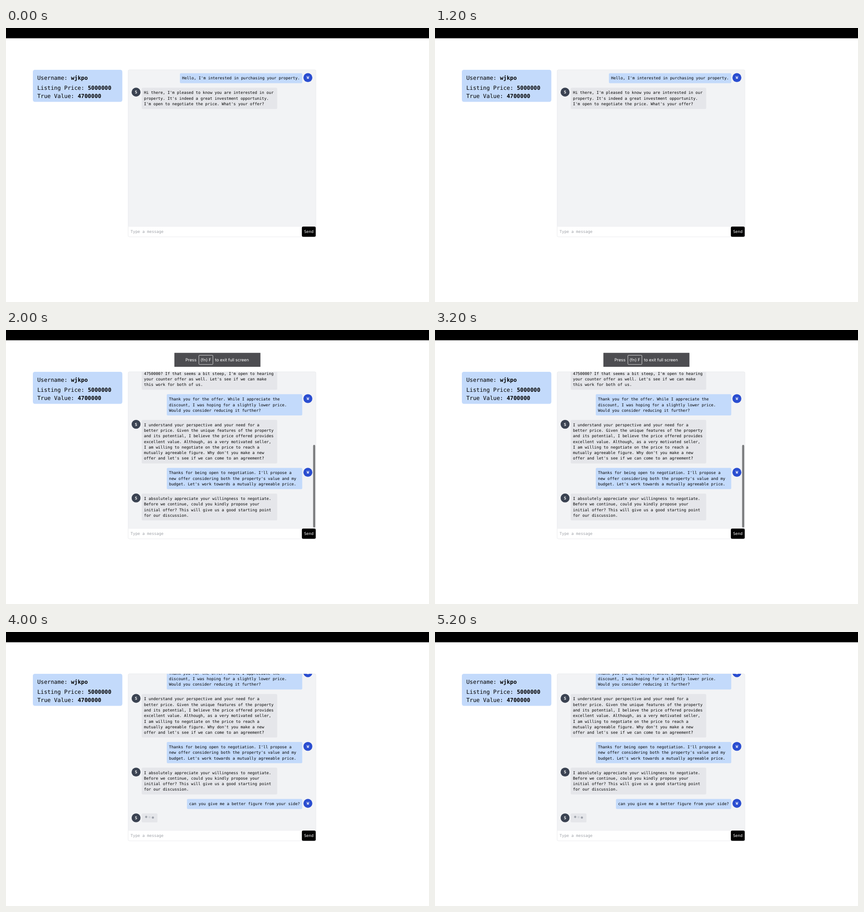
An HTML page with a canvas that plays this animation: 929x603 px, repeating every 6 s.

```html
<!DOCTYPE html>
<html lang="en">
<head>
<meta charset="utf-8">
<title>Negotiation chat</title>
<style>
  html, body { margin: 0; width: 100%; height: 100%; overflow: hidden; background: #fff; }
  canvas { display: block; }
</style>
</head>
<body>
<canvas id="stage" width="929" height="603"></canvas>
<script>
const ctx = document.getElementById('stage').getContext('2d');
ctx.textRendering = 'geometricPrecision';

const MONO = '"DejaVu Sans Mono", monospace';
const SCALE = 0.6143;
const SMALL = 14 * SCALE, LARGE = 20 * SCALE;
const LINE = 20 * SCALE, PAD = 8 * SCALE, GAP = 16 * SCALE;
const CHAR = SMALL * 0.602;
const WIDE = 297.5;
const BLUE = '#c3dafb', GREY = '#e5e6ea', PANEL = '#f2f3f5';

const greeting = [
  { own: true, lines: ["Hello, I'm interested in purchasing your property."] },
  { lines: [
    "Hi there, I'm pleased to know you are interested in our",
    "property. It's indeed a great investment opportunity.",
    "I'm open to negotiate the price. What's your offer?"] },
];

const negotiation = [
  { own: true, lines: [
    'Thank you for the offer. While I appreciate the',
    'discount, I was hoping for a slightly lower price.',
    'Would you consider reducing it further?'] },
  { lines: [
    'I understand your perspective and your need for a',
    'better price. Given the unique features of the property',
    'and its potential, I believe the price offered provides',
    'excellent value. Although, as a very motivated seller,',
    'I am willing to negotiate on the price to reach a',
    "mutually agreeable figure. Why don't you make a new",
    "offer and let's see if we can come to an agreement?"] },
  { own: true, lines: [
    "Thanks for being open to negotiation. I'll propose a",
    "new offer considering both the property's value and my",
    "budget. Let's work towards a mutually agreeable price."] },
  { lines: [
    'I absolutely appreciate your willingness to negotiate.',
    'Before we continue, could you kindly propose your',
    'initial offer? This will give us a good starting point',
    'for our discussion.'] },
];

// The first two lines are scrolled out of view.
const counterOffer = { lines: ['', '',
  "4750000? If that seems a bit steep, I'm open to hearing",
  "your counter offer as well. Let's see if we can make",
  'this work for both of us.'] };

const question = { own: true, lines: ['can you give me a better figure from your side?'] };

const height = row => row.lines.length * LINE + 2 * PAD;

const scenes = [
  { top: 99.5, rows: greeting },
  { top: 141.3 - GAP - height(counterOffer), rows: [counterOffer, ...negotiation], fullscreen: true },
  { top: 79.9, rows: [...negotiation, question], typing: true },
];

function box(x, y, w, h, r, fill, stroke) {
  ctx.beginPath();
  ctx.roundRect(x, y, w, h, r);
  if (fill) { ctx.fillStyle = fill; ctx.fill(); }
  if (stroke) { ctx.strokeStyle = stroke; ctx.lineWidth = 1; ctx.stroke(); }
}

function dot(x, y, r, fill) {
  ctx.beginPath();
  ctx.arc(x, y, r, 0, 2 * Math.PI);
  ctx.fillStyle = fill;
  ctx.fill();
}

function text(str, x, y, font, fill, align = 'left') {
  ctx.font = font;
  ctx.fillStyle = fill;
  ctx.textAlign = align;
  ctx.fillText(str, x, y);
}

function avatar(own, top) {
  const x = own ? 663 : 285.7, y = top + 9.7;
  dot(x, y, 16 * SCALE, own ? '#2a4dd0' : '#3b4352');
  text(own ? 'W' : 'S', x, y + 3.1, `bold ${SMALL}px ${MONO}`, '#fff', 'center');
}

function message(row, top) {
  const { own, lines } = row;
  const width = lines.length > 1 ? WIDE : lines[0].length * CHAR + 2 * PAD;
  const left = own ? 650.6 - width : 298.1;
  box(left, top, width, height(row), 2.5, own ? BLUE : GREY);
  lines.forEach((line, i) =>
    text(line, left + PAD, top + PAD + (i + 0.5) * LINE + 2.9, `${SMALL}px ${MONO}`, '#000'));
  avatar(own, top);
}

function typingBubble(top) {
  box(298.1, top, 34.6, 19.6, 2.5, GREY);
  dot(307.9, 407, 2.45, '#a0a4ac');
  dot(315.2, 407.6, 2.45, '#d2d5da');
  dot(322.6, 408.4, 2.45, '#9ca0a9');
  avatar(false, top);
}

function profile() {
  box(59, 92, 196.5, 70.6, 4.5, BLUE);
  const fields = [['Username: ', 'wjkpo', 114.4], ['Listing Price: ', '5000000', 136.3], ['True Value: ', '4700000', 153.5]];
  for (const [label, value, y] of fields) {
    text(label, 68.7, y, `${LARGE}px ${MONO}`, '#000');
    text(value, 68.7 + label.length * LARGE * 0.602, y, `bold ${LARGE}px ${MONO}`, '#000');
  }
}

function inputBar() {
  box(268.3, 436.8, 412.4, 22.8, [0, 0, 3, 3], '#fff', '#eeeff1');
  text('Type a message', 273.6, 451.2, `${SMALL}px ${MONO}`, '#9fa2a8');
  box(649.8, 437, 30.4, 22.4, 3, '#000');
  text('Send', 665, 451.2, `${SMALL}px ${MONO}`, '#fff', 'center');
}

function fullscreenHint() {
  const font = '9.2px Inter, sans-serif';
  box(369.8, 50.3, 189, 30.8, 0.5, '#4d4d51');
  box(423.6, 55.5, 30.8, 20.4, 1.5, null, '#d5d5d6');
  text('Press', 394, 69, font, '#fff');
  text('(fn) F', 439, 69, font, '#fff', 'center');
  text('to exit full screen', 459, 69, font, '#fff');
}

function draw(ms) {
  const scene = scenes[Math.floor(ms / 2000) % scenes.length];
  ctx.fillStyle = '#fff';
  ctx.fillRect(0, 0, 929, 603);
  ctx.fillStyle = '#000';
  ctx.fillRect(0, 0, 929, 22.6);
  profile();

  box(268.3, 92, 412.4, 367.6, 3, PANEL, '#e9eaed');
  ctx.save();
  ctx.beginPath();
  ctx.rect(268, 92, 413, 344.6);
  ctx.clip();
  let top = scene.top;
  for (const row of scene.rows) {
    message(row, top);
    top += height(row) + GAP;
  }
  if (scene.typing) typingBubble(top);
  if (scene.fullscreen) box(674.5, 252.8, 4.6, 182, 2.3, '#7b7c7e');
  ctx.restore();

  inputBar();
  if (scene.fullscreen) fullscreenHint();
}

let start;
function tick(now) {
  start ??= now;
  draw(now - start);
  requestAnimationFrame(tick);
}
draw(0);
requestAnimationFrame(tick);
</script>
</body>
</html>
```
